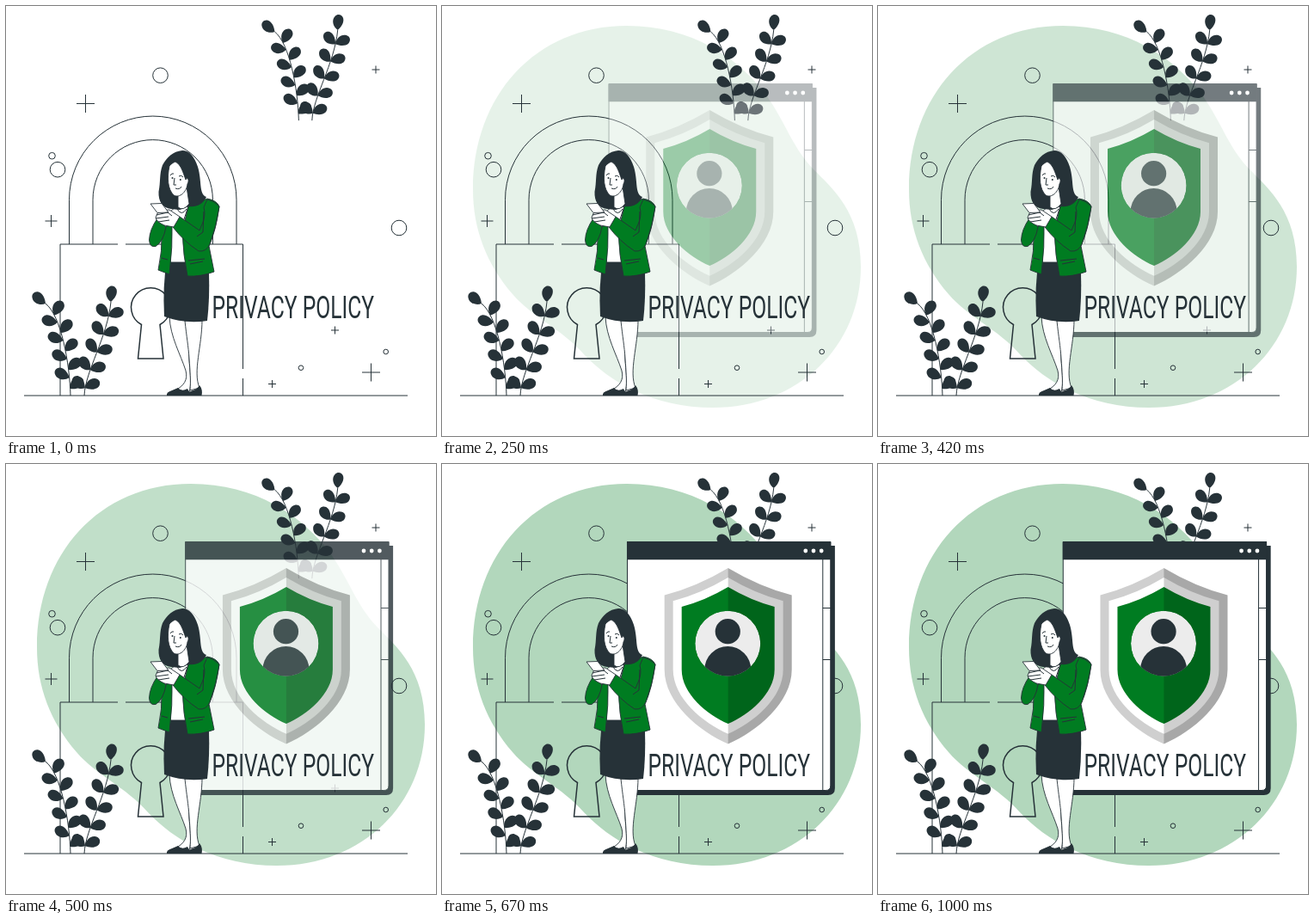
Animation of 500 by 500 pixels, one loop 1.04 s. Source, as an HTML page:

```html
<!DOCTYPE html>
<html lang="en">
<head>
<meta charset="utf-8">
<title>Privacy policy</title>
<style>
  html, body { margin: 0; width: 100%; height: 100%; overflow: hidden; background: #fff; }
  svg { display: block; width: 100vw; height: 100vh; }
  .line { fill: none; stroke: #263238; stroke-width: 1; }
  .ink { fill: #263238; }
  .skin { fill: #fff; stroke: #263238; stroke-width: .9; stroke-linejoin: round; }
  .coat { fill: #007c21; stroke: #263238; stroke-width: .9; stroke-linejoin: round; }
  text { font: 400 36px Roboto, "Open Sans", sans-serif; text-anchor: middle; fill: #263238; }
</style>
</head>
<body>
<svg viewBox="0 0 500 500">
  <defs>
    <clipPath id="badge"><circle cx="334" cy="208.7" r="38"/></clipPath>
  </defs>

  <path id="blob" fill="#b2d7bc" d="M36 213C36 105 108 23 215 23C290 23 345 60 378 105C400 137 408 165 432 190C455 213 487 240 487 303C487 395 415 467 315 467C245 467 195 437 165 405C140 376 105 362 82 335C52 300 36 260 36 213Z"/>

  <g id="marks" class="line"></g>

  <g class="line">
    <path d="M21 453H467"/>
    <path d="M73.5 277V225.3A97.2 97.2 0 0 1 268 225.3V277M101 277V225.3A69.7 69.7 0 0 1 240.4 225.3V277"/>
    <path d="M130 277H63V453M139 277H275.5V422M275.5 433V453"/>
    <path d="M157.5 370.5A22.7 22.7 0 1 1 179 370.5L183 410H153.5Z" stroke-width="1.5"/>
  </g>

  <g id="plant" class="ink"></g>
  <use href="#plant" transform="translate(268 -304) scale(.965)"/>

  <g id="panel">
    <path class="ink" d="M222 95H458.6V377Q458.6 385 450.6 385H222Z"/>
    <path fill="#fff" stroke="#263238" d="M217.2 91H453.5V374Q453.5 379.5 448 379.5H217.2Z"/>
    <path class="line" d="M444.5 111V379.5M444.5 167.5H454M444.5 227.5H454"/>
    <path class="ink" d="M216.7 90H454V111.3H216.7Z"/>
    <path stroke="#fff" stroke-width="4.8" stroke-linecap="round" stroke-dasharray="0 9.2" d="M424.5 101H444"/>
    <g id="shield" transform="translate(334.4)"></g>
    <g clip-path="url(#badge)">
      <circle cx="334" cy="208.7" r="38" fill="#ececec"/>
      <circle class="ink" cx="334" cy="194.7" r="14.6"/>
      <path class="ink" d="M307 250V239A27 27 0 0 1 361 239V250Z"/>
    </g>
  </g>

  <g id="woman">
    <path class="skin" d="M190 361C191 385 203 405 209 424C212 435 206 442 198 446L213 449C216 440 214 425 213 412L212 367Z"/>
    <path class="skin" d="M208 366C210 385 212 395 213 410C214 425 215 435 214 447L225 444C217 425 228 395 228 365Z"/>
    <path class="ink" d="M187 453Q186 449 193 447L200 444Q204 449 211 445L214 450V453ZM211 453Q211 449 217 447Q222 446 225 441Q229 446 227.5 453Z"/>
    <path class="ink" d="M187 296L209 297L236 311Q237 340 234 366Q208 370 184 361Q182 325 187 296Z"/>
    <path class="skin" d="M190 240L199 232L214 230V298H191Z"/>
    <path class="coat" d="M181 262L193 250Q194 280 190 312L177 307Q182 285 181 262Z"/>
    <path class="coat" d="M176 247Q167 260 166.5 272Q167 281 174 279.5Q183 274 186 257Z"/>
    <path class="coat" d="M212 233L234 224Q245 226 248 233Q244 262 236 279L242 309Q226 315 211 314Q206 290 205 262Z"/>
    <path class="ink" d="M205 168C194 169 187 176 182 185C178 196 180 204 177.5 216C177 227 182 235 192 236L202 237L213 233C221 234 229 231 233 222C224 219 228 203 223 187C219 175 213 168 205 168Z"/>
    <path class="skin" d="M200 219V234Q206 239 213 230L210 210Z"/>
    <path class="skin" d="M190 186C187 200 188 213 195 220C202 224 210 216 211 207C214 201 210 199 209 202C206 194 204 185 197 181C194 182 192 184 190 186Z"/>
    <path class="line" d="M191 197Q193 194 195 195M201 198Q204 196 206 199M196 200L195 208H198M197 212Q202 214 204 210M199 236Q204 245 210 236"/>
    <circle class="ink" cx="193.5" cy="200" r="1"/><circle class="ink" cx="202.8" cy="202" r="1"/>
    <path class="coat" d="M230 234C233 246 228 253 225 261L202 245L194 257Q207 274 224 285Q233 286 237 277Q245 255 248 233Q241 226 234 225Z"/>
    <path class="line" d="M212 233L207 248M230 239L229 263L222 268M212 296L231 294M214 300L229 297M181 293L188 295"/>
    <path class="skin" d="M176 241Q183 236 190 237L202 245L195 257L184 255Q175 251 174 246Z"/>
    <path class="skin" d="M168 230L181 229.5L189 240L176 240.5Z"/>
    <path class="line" d="M175 243L188 240L193 244M174 247L189 245M177 251L190 249"/>
  </g>

  <text transform="translate(333.8 363) scale(.685 1)">PRIVACY POLICY</text>
</svg>
<script>
const $ = id => document.getElementById(id);
const add = (parent, tag, attrs) => {
  const el = document.createElementNS("http://www.w3.org/2000/svg", tag);
  for (const name in attrs) el.setAttribute(name, attrs[name]);
  parent.append(el);
  return el;
};

// Leaves sit in pairs along each stem, fanned out from its direction
function branch(d, outer, lag) {
  const plant = $("plant");
  const stem = add(plant, "path", { d, class: "line", "stroke-width": 1.4 });
  const length = stem.getTotalLength();
  const leaf = (at, turn) => {
    if (at > length - 4) return;
    const p = stem.getPointAtLength(at), q = stem.getPointAtLength(at + 2);
    const angle = Math.atan2(p.y - q.y, p.x - q.x) * 180 / Math.PI + turn;
    add(plant, "path", {
      d: "M0 0C3-6 11-9 16-5C20-2 19 3 15 5C10 7 4 4 0 0Z",
      transform: `translate(${p.x} ${p.y}) rotate(${angle})`
    });
  };
  leaf(0, 0);
  for (let at = 17; at < length; at += 22) {
    leaf(at, -56 * outer);
    leaf(at + lag, 56 * outer);
  }
}
branch("M46 346C64 360 74 415 75 453", -1, 9);
branch("M122 344C118 385 92 425 91 453", 1, 0);

const plus = (x, y, r) => add($("marks"), "path", { d: `M${x - r} ${y}h${2 * r}M${x} ${y - r}v${2 * r}` });
const ring = (cx, cy, r) => add($("marks"), "circle", { cx, cy, r });
plus(92.5, 113.5, 10.5);
plus(424.5, 426, 10.5);
plus(52.5, 250, 7);
plus(430, 74, 4.5);
plus(382.5, 377, 4.5);
plus(309.5, 439.5, 4.5);
ring(179.5, 80.7, 8.8);
ring(60, 190.2, 8.8);
ring(457, 258, 8.8);
ring(53.5, 174.2, 3.8);
ring(441.7, 402, 2.8);
ring(343, 420.7, 2.8);

// Nested shields, each followed by a shade over its right half
const half = (w, inset) => {
  const top = 121 + inset * 1.1, shoulder = 152.5 + inset * .67;
  const waist = 239, tip = 325.5 - inset * 1.17, drop = tip - waist;
  return `M0 ${top}Q${w * .5} ${top + (shoulder - top) * .7} ${w} ${shoulder}V${waist}` +
    `C${w} ${waist + drop * .45} ${w * .45} ${tip - drop * .17} 0 ${tip}Z`;
};
["#cfcfcf", "#fff", "#007c21"].forEach((fill, i) => {
  const inset = 10 * i, w = 74 - inset;
  add($("shield"), "path", { d: half(-w, inset) + half(w, inset), fill });
});
add($("shield"), "path", { d: half(74, 0), opacity: .19 });

const LOOP = 1040, STEPS = 25;
function draw(now) {
  const step = Math.floor((now % LOOP + 4) / LOOP * STEPS);
  const fade = Math.min(1, Math.max(0, .08 * (step - 2)));
  // Slide in, then drift a little further and back
  const x = step < 14.5 ? 2.44 * (step - 2) - 32.9 : -2.4 * Math.abs(step - 19.75) / 5.25;
  $("blob").setAttribute("opacity", fade);
  $("panel").setAttribute("opacity", fade);
  $("panel").setAttribute("transform", `translate(${x})`);
  requestAnimationFrame(draw);
}
draw(performance.now());
</script>
</body>
</html>
```
